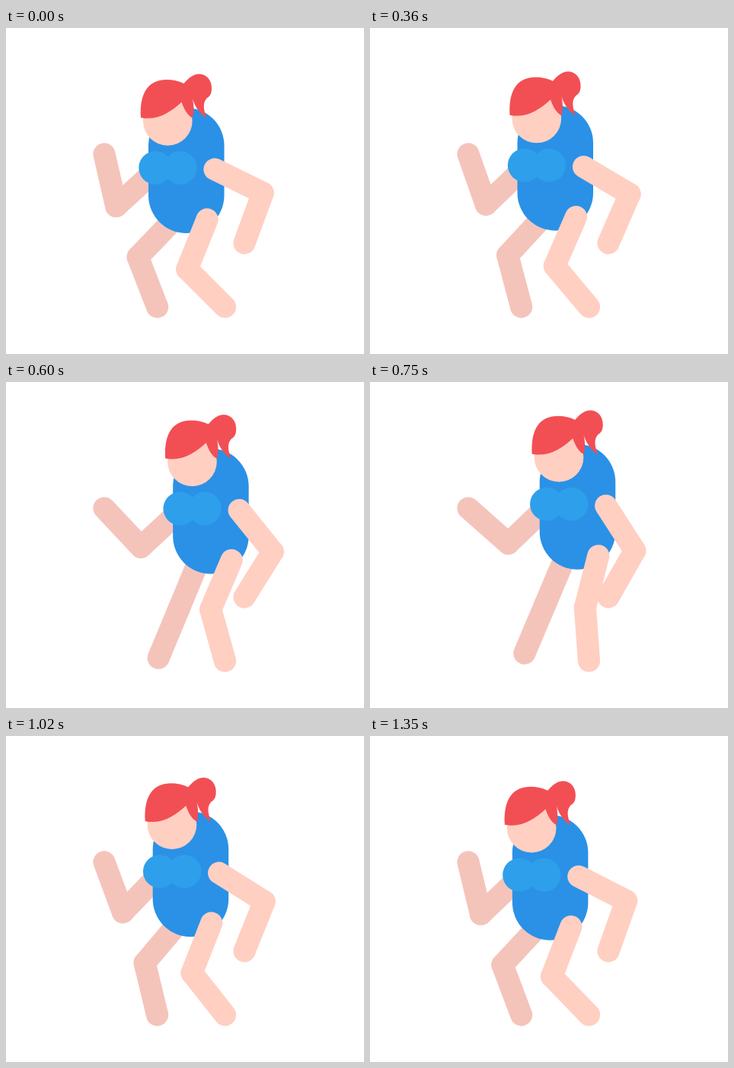
Recreate the animation shown at these times as an HTML page without scripts. Size 470 by 429 pixels, loop 1.38 s.

```html
<!DOCTYPE html>
<html lang="en">
<head>
<meta charset="utf-8">
<title>Dancing figure</title>
<style>
  @property --x { syntax: "<number>"; inherits: true; initial-value: 0; }
  @property --y { syntax: "<number>"; inherits: true; initial-value: 0; }

  html, body { margin: 0; width: 100%; height: 100%; overflow: hidden; background: #fff; }
  svg { display: block; width: 470px; height: 429px; }

  .dancer {
    transform: translate(calc(var(--x) * 1px), calc(var(--y) * 1px));
    animation: sway 690ms cubic-bezier(.333, 0, .667, 1) -3ms infinite alternate;
  }
  @keyframes sway {
    0%      { --x: 0;    --y: 0; }
    33.333% { --x: -3.7; --y: -32.5; }
    66.667% { --x: 12.7; --y: 14.3; }
    100%    { --x: 41.1; --y: -32; }
  }

  /* Two equal bones reach from the joint (--jx, --jy) to a fixed point (--tx, --ty). */
  .limb {
    --bone: 70.3;
    --dx: calc(var(--tx) - var(--jx) - var(--x));
    --dy: calc(var(--ty) - var(--jy) - var(--y));
    --bend: calc(var(--side) * acos(min(1, hypot(var(--dx), var(--dy)) / (2 * var(--bone)))));
    transform: translate(calc(var(--jx) * 1px), calc(var(--jy) * 1px))
               rotate(calc(atan2(var(--dy), var(--dx)) + var(--bend)));
    stroke: #ffcfc2;
    stroke-width: 29.2;
    stroke-linecap: round;
  }
  .lower { transform: translate(calc(var(--bone) * 1px), 0px) rotate(calc(-2 * var(--bend))); }
  .far { stroke: #f4c4bb; }
  .arm { --side: -1; }
  .leg { --side: 1; }
  .far.arm  { --jx: 196.5; --jy: 187;   --tx: 129;   --ty: 166; }
  .far.leg  { --jx: 221.8; --jy: 250.7; --tx: 198.6; --ty: 367; }
  .near.arm { --jx: 274;   --jy: 186;   --tx: 313;   --ty: 283; }
  .near.leg { --jx: 264;   --jy: 252;   --tx: 287.5; --ty: 367; }

  .suit { fill: #2a91e6; }
  .bust { fill: #2e9fea; }
  .face { fill: #ffcfc2; }
  .hair { fill: #f24f54; }
</style>
</head>
<body>
<svg viewBox="0 0 470 429">
  <defs><path id="bone" d="M0 0H70.3"/></defs>
  <g class="dancer">
    <g class="limb far arm"><use href="#bone"/><use href="#bone" class="lower"/></g>
    <g class="limb far leg"><use href="#bone"/><use href="#bone" class="lower"/></g>

    <rect class="suit" x="187" y="105" width="99.5" height="165" rx="49.75"/>
    <g class="bust">
      <circle cx="196.3" cy="184" r="22"/>
      <circle cx="228.7" cy="184" r="22"/>
    </g>
    <circle class="face" cx="212.3" cy="122.4" r="32.3"/>
    <path class="hair" d="M177 118C175 84 188 68 211 68Q223 68 233.500 73
      C240 65 247 60.500 254 60.500C264 61 270 69 270 79C270 86 268 90 264 92
      C258 98 259 107 263.500 118.500C253 112 247 102 244 90
      C247 100 247 110 245 118.500C238 115 234 107 230.500 97.500
      C216 111 199 122 177 118Z"/>

    <g class="limb near leg"><use href="#bone"/><use href="#bone" class="lower"/></g>
    <g class="limb near arm"><use href="#bone"/><use href="#bone" class="lower"/></g>
  </g>
</svg>
</body>
</html>
```
